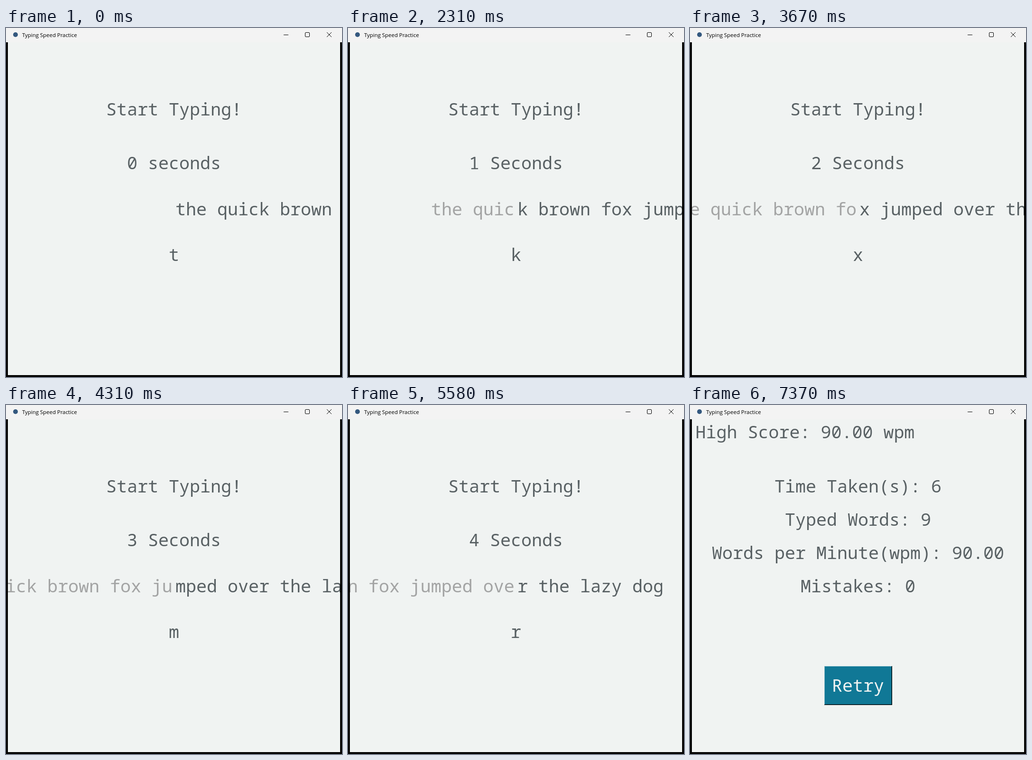
Animation of 708x734 px, one loop 8000 ms. Source, as an HTML page:

```html
<!DOCTYPE html>
<html lang="en">
<head>
<meta charset="utf-8">
<title>Typing Speed Practice</title>
<style>
  html, body { margin: 0; width: 100%; height: 100%; overflow: hidden; background: #000; }
  svg { display: block; }
  text { white-space: pre; }
  .mono { font: 36.667px "Noto Sans Mono", monospace; fill: #596164; }
  .mid { text-anchor: middle; }
  .done { fill: #a3a4a4; }
  .title { font: 11.4px "Open Sans", "Noto Sans", sans-serif; fill: #000; }
  .ctl { fill: none; stroke: #000; stroke-width: 1; }
</style>
</head>
<body>
<svg width="708" height="734" viewBox="0 0 708 734">
  <defs><clipPath id="pane"><rect x="4" y="30" width="700" height="700"/></clipPath></defs>
  <rect width="708" height="734"/>
  <rect width="708" height="30" fill="#f3f3f3"/>
  <circle cx="20" cy="14" r="5" fill="#34587f"/>
  <text class="title" x="34" y="19">Typing Speed Practice</text>
  <path class="ctl" d="M585 14.5h10"/>
  <rect class="ctl" x="630.5" y="9.5" width="9" height="9" rx="1.5"/>
  <path class="ctl" d="M676 9l10 10m0-10l-10 10"/>

  <g clip-path="url(#pane)">
    <rect x="4" y="30" width="700" height="700" fill="#f0f3f2"/>
    <g id="typing">
      <text class="mono mid" x="354" y="184">Start Typing!</text>
      <text class="mono mid" x="354" y="297" id="clock"></text>
      <text class="mono done" y="394" id="past"></text>
      <text class="mono" x="357" y="394" id="rest"></text>
      <text class="mono mid" x="354" y="490" id="key"></text>
    </g>
    <g id="results">
      <text class="mono" x="11.5" y="70">High Score: 90.00 wpm</text>
      <text class="mono mid" x="354" y="184">Time Taken(s): 6</text>
      <text class="mono mid" x="354" y="254">Typed Words: 9</text>
      <text class="mono mid" x="354" y="324">Words per Minute(wpm): 90.00</text>
      <text class="mono mid" x="354" y="394">Mistakes: 0</text>
      <rect x="283" y="549" width="143" height="82"/>
      <rect x="283" y="549" width="142" height="81" fill="#87bbca"/>
      <rect x="284" y="550" width="141" height="80" fill="#0a485a"/>
      <rect x="284" y="550" width="140" height="79" fill="#107896"/>
      <text class="mono mid" x="354" y="603" style="fill:#f0f3f2">Retry</text>
    </g>
  </g>
</svg>
<script>
  const LOOP = 8000, RESULTS_AT = 7370, PITCH = 22, PAST_END = 351;
  const PHRASE = "the quick brown fox jumped over the lazy dog";
  const KEY_TIMES = [
    1320, 1500, 1590, 1680, 1860, 1950, 2130, 2220, 2400, 2490, 2580, 2860,
    3040, 3130, 3220, 3400, 3490, 3670, 3760, 3940, 4030, 4310, 4490, 4670,
    4760, 5040, 5130, 5220, 5310, 5580, 5670, 5760, 5940, 6030, 6120, 6290,
    6380, 6470, 6650, 6830, 7010, 7100
  ];
  const TICK_TIMES = [2310, 3310, 4310, 5220, 6200, 7190];

  const el = id => document.getElementById(id);
  const [typing, results, clock, past, rest, key] =
    ["typing", "results", "clock", "past", "rest", "key"].map(el);
  const passed = (times, t) => times.filter(x => x <= t).length;
  const show = (node, on) => node.setAttribute("visibility", on ? "visible" : "hidden");

  function draw(t) {
    const typed = passed(KEY_TIMES, t);
    const secs = passed(TICK_TIMES, t);
    const finished = t >= RESULTS_AT;
    show(typing, !finished);
    show(results, finished);
    clock.textContent = secs ? secs + " Seconds" : "0 seconds";
    past.setAttribute("x", PAST_END - typed * PITCH);
    past.textContent = PHRASE.slice(0, typed);
    rest.textContent = PHRASE.slice(typed);
    key.textContent = PHRASE[typed];
  }

  const start = performance.now();
  function frame() {
    draw((performance.now() - start) % LOOP);
    requestAnimationFrame(frame);
  }
  frame();
</script>
</body>
</html>
```
